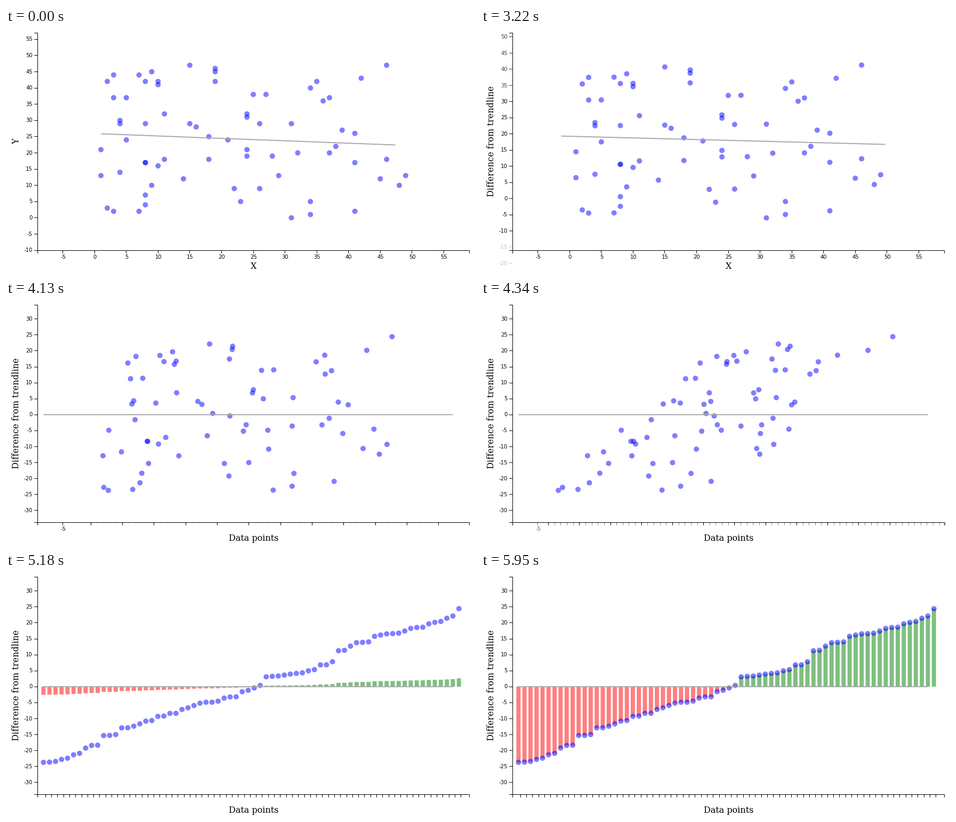
Animation of 880x460 px, one loop 6860 ms. Source, as a matplotlib script:

```python
import numpy as np
import matplotlib.pyplot as plt
from matplotlib.animation import FuncAnimation
from matplotlib.collections import LineCollection, PatchCollection
from matplotlib.patches import Circle, Rectangle

W, H, DPI = 880, 460, 80
PX = 72 / DPI                       # points per pixel
LEFT, RIGHT, TOP, BOTTOM = 59, 869, 9, 419
STEP_MS, FRAMES = 70, 98
MOVE_MS = 1000
DETREND_AT, SORT_AT, BARS_AT = 2820, 3864, 4881

COLUMNS = {
    1: (21, 13), 2: (42, 3), 3: (44, 37, 2), 4: (30, 29, 14), 5: (37, 24),
    7: (44, 2), 8: (42, 29, 17, 17, 7, 4), 9: (45, 10), 10: (42, 41, 16),
    11: (32, 18), 14: (12,), 15: (47, 29), 16: (28,), 18: (25, 18),
    19: (46, 45, 42), 21: (24,), 22: (9,), 23: (5,), 24: (32, 31, 21, 19),
    25: (38,), 26: (29, 9), 27: (38,), 28: (19,), 29: (13,), 31: (29, 0),
    32: (20,), 34: (40, 5, 1), 35: (42,), 36: (36,), 37: (37, 20), 38: (22,),
    39: (27,), 41: (26, 17, 2), 42: (43,), 45: (12,), 46: (47, 18),
    48: (10,), 49: (13,),
}
xs, ys = np.array([(x, y) for x, col in COLUMNS.items() for y in col], float).T
n = len(xs)
slope, intercept = np.polyfit(xs, ys, 1)
resid = ys - (slope * xs + intercept)
rank = np.empty(n, int)
rank[np.argsort(resid, kind="stable")] = np.arange(n)


def linear(values, start, end):
    """Scale that spans the values with a margin of ten on both sides."""
    lo, hi = values.min() - 10, values.max() + 10
    return lambda v: start + (v - lo) / (hi - lo) * (end - start)


x_value = linear(xs, LEFT, RIGHT)
y_value = linear(ys, BOTTOM, TOP)
y_resid = linear(resid, BOTTOM, TOP)

GAP = 0.3
SLOT = (RIGHT - LEFT) / (n - GAP + 2)
BAND = SLOT * (1 - GAP)


def x_rank(k):
    return LEFT + SLOT * (k + 1)


def x_rank_tick(k):
    return x_rank(k) + BAND / 2


def lerp(a, b, p):
    return a + (b - a) * p


def progress(ms, start):
    t = min(max((ms - start) / MOVE_MS, 0), 1)
    return 4 * t ** 3 if t < 0.5 else 1 - 4 * (1 - t) ** 3


def pixel(v):
    return np.floor(v) + 0.5


fig = plt.figure(figsize=(W / DPI, H / DPI), dpi=DPI, facecolor="white")
ax = fig.add_axes([0, 0, 1, 1])

OLD_Y, NEW_Y = range(-10, 56, 5), range(-30, 31, 5)
OLD_X, NEW_X = range(-5, 56, 5), range(n)


def label(x, y, text, **kw):
    ax.text(x, y, text, family="DejaVu Sans", size=10 * PX, va="baseline", **kw)


def title(x, y, text, angle=0):
    ax.text(x, y, text, family="DejaVu Serif", size=16 * PX, ha="center",
            va="baseline", rotation=angle, rotation_mode="anchor")


def tick_alpha(v, old, new, p):
    return (1 - p if v in old else 0) + (p if v in new else 0)


def add_ticks(segments, alphas):
    colors = [(0, 0, 0, min(a, 1)) for a in alphas]
    ax.add_collection(LineCollection(segments, colors=colors, linewidths=PX,
                                     capstyle="butt", snap=False, zorder=1))


def draw_y_axis(p):
    segments, alphas = [], []
    for v in sorted({*OLD_Y, *NEW_Y}):
        alpha = tick_alpha(v, OLD_Y, NEW_Y, p)
        y = lerp(y_value(v), y_resid(v), p)
        if alpha < 0.002 or not -20 < y < H + 20:
            continue
        segments.append([(LEFT - 6, pixel(y)), (LEFT, pixel(y))])
        alphas.append(alpha)
        label(LEFT - 9, y + 3.2, str(v), ha="right", alpha=min(alpha, 1))
    add_ticks(segments, alphas)


def draw_x_axis(p, ranked):
    segments, alphas = [], []
    for v in sorted({*OLD_X, *NEW_X}):
        alpha = tick_alpha(v, OLD_X, NEW_X, p)
        if alpha < 0.002:
            continue
        # a tick without a rank fades out where it stands
        x = lerp(x_value(v), x_rank_tick(v), p) if v in NEW_X else x_value(v)
        segments.append([(pixel(x), BOTTOM), (pixel(x), BOTTOM + 6)])
        alphas.append(alpha)
        if v in OLD_X and (not ranked or v not in NEW_X):
            label(x + 0.4, BOTTOM + 16.1, str(v), ha="center",
                  alpha=min(alpha, 1))
    add_ticks(segments, alphas)


def draw_frame():
    l, r, t, b = (v + 0.5 for v in (LEFT, RIGHT, TOP, BOTTOM))
    for px, py in (((l - 6.5, l, l, l - 6.5), (t, t, b, b)),
                   ((l, l, r, r), (b + 5.5, b, b, b + 5.5))):
        ax.plot(px, py, color="black", lw=PX, snap=False, zorder=1,
                solid_capstyle="butt", solid_joinstyle="miter")


def draw_bars(p):
    zero = y_resid(0)
    bars = [Rectangle((x_rank(k) - BAND / 2, zero), BAND,
                      (y_resid(v) - zero) * p) for k, v in zip(rank, resid)]
    colors = ["green" if v > 0 else "red" for v in resid]
    ax.add_collection(PatchCollection(bars, facecolors=colors, alpha=0.5,
                                      linewidths=0, snap=False, zorder=2))


def draw_dots(detrend, sort):
    px = lerp(x_value(xs), x_rank(rank), sort)
    py = lerp(y_value(ys), y_resid(resid), detrend)
    dots = [Circle(c, 5) for c in zip(px, py)]
    ax.add_collection(PatchCollection(dots, facecolors="blue", alpha=0.5,
                                      linewidths=0, zorder=3))


def draw_trend(p):
    ends = np.array([1, 47.4])
    px = lerp(x_value(ends), x_rank(np.array([0, n - 2])), p)
    py = lerp(y_value(slope * ends + intercept), y_resid(0), p)
    ax.plot(px, py, color="#aaaaaa", lw=2 * PX, snap=False, zorder=4,
            solid_capstyle="butt")


def draw(i):
    ms = i * STEP_MS
    detrend, sort, grow = (progress(ms, s)
                           for s in (DETREND_AT, SORT_AT, BARS_AT))
    ranked = ms >= SORT_AT
    ax.cla()
    ax.set(xlim=(0, W), ylim=(H, 0))
    ax.axis("off")
    draw_frame()
    draw_y_axis(detrend)
    draw_x_axis(sort, ranked)
    title(24, 214, "Difference from trendline" if ms >= DETREND_AT else "Y", 90)
    title(464.5, 454, "Data points" if ranked else "X")
    if grow > 0:
        draw_bars(grow)
    draw_dots(detrend, sort)
    draw_trend(detrend)
    return []


anim = FuncAnimation(fig, draw, frames=FRAMES, interval=STEP_MS, repeat=True,
                     repeat_delay=0, init_func=lambda: draw(0))
plt.show()
```
